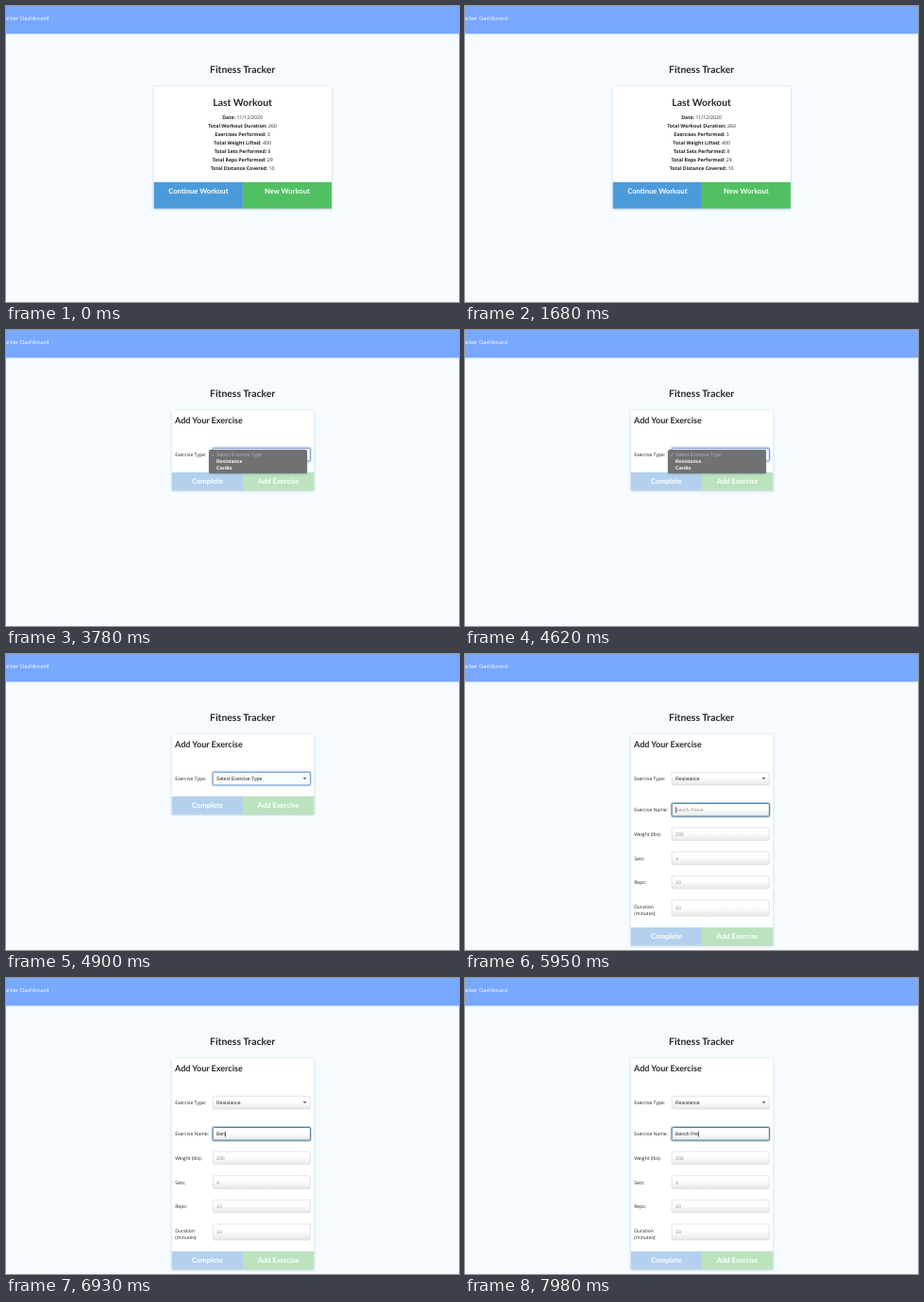
An HTML page for the animation above (8000 ms loop, 480 by 314 pixels).

```html
<!DOCTYPE html>
<html lang="en">
<head>
<meta charset="utf-8">
<title>Fitness Tracker</title>
<style>
  html, body { margin: 0; width: 100%; height: 100%; overflow: hidden; background: #f5fbfe; }
  svg { display: block; width: 100vw; height: 100vh; }
  text { font: 5.2px "Liberation Sans", Arial, sans-serif; fill: #222; text-rendering: geometricPrecision; white-space: pre; }
  .label { font: 5.05px "Open Sans", "Noto Sans", sans-serif; }
  .stat { font: 5.2px "Open Sans", "Noto Sans", sans-serif; text-anchor: middle; }
  .stat tspan { font-weight: 700; }
  .nav { font: 5.9px "Open Sans", "Noto Sans", sans-serif; fill: #fff; text-anchor: end; }
  .head { font: 700 10.4px Lato, sans-serif; fill: #25292d; }
  .sub { font-size: 9px; }
  .button { font: 700 7.65px Lato, sans-serif; fill: #fff; }
  .mid { text-anchor: middle; }
  .hint { fill: #8d8f91; }
  .light { fill: #fff; }
  .bold { font-weight: 700; }
</style>
</head>
<body>
<svg viewBox="0 0 480 314" preserveAspectRatio="none">
  <defs>
    <linearGradient id="shade" x2="0" y2="1">
      <stop offset=".4" stop-color="#fff"/><stop offset="1" stop-color="#e6e8e9"/>
    </linearGradient>
    <filter id="shadow" x="-10%" y="-10%" width="120%" height="120%">
      <feDropShadow dx="0" dy=".6" stdDeviation=".8" flood-color="#6d8798" flood-opacity=".5"/>
    </filter>
  </defs>
  <rect width="480" height="314" fill="#f5fbfe"/>
  <rect width="480" height="29.5" fill="#78a8ff"/>
  <text class="nav" x="45.3" y="15.3">Fitness Tracker Dashboard</text>
  <text class="head mid" x="250.6" y="70.5">Fitness Tracker</text>
  <g id="view"></g>
</svg>
<script>
const LOOP = 8000;
const FORM_AT = 2940, MENU_AT = 3780, MENU_FADE = 4620, MENU_GONE = 4830;
const CHOSEN_AT = 4970, FOCUS_AT = 5950, SUGGEST_AT = 6020, CARET_OFF = 6440;
const TYPED = 'Bench Pre';
const KEYS = [6580, 6790, 6930, 7140, 7280, 7490, 7700, 7910, 7980];

const stats = [
  ['Date', '11/12/2020'], ['Total Workout Duration', 260], ['Exercises Performed', 3],
  ['Total Weight Lifted', 400], ['Total Sets Performed', 8],
  ['Total Reps Performed', 29], ['Total Distance Covered', 10]
];
const suggestions = ['Tilda Morrelby', 'Tilda Rose morrelby', 'Vesk', 'Pebbin', 'Drom'];

const view = document.getElementById('view');
const pen = document.createElement('canvas').getContext('2d');
pen.font = '52px "Liberation Sans", Arial, sans-serif';
const textWidth = s => pen.measureText(s).width / 10;

const text = (x, y, s, cls = '') => `<text x="${x}" y="${y}" class="${cls}">${s}</text>`;
const rect = (x, y, w, h, fill, more = '') =>
  `<rect x="${x}" y="${y}" width="${w}" height="${h}" fill="${fill}" ${more}/>`;

// White card with a two-part button bar along its bottom edge
function card(x, w, bottom, barHeight, left, right, leftFill, rightFill, textDrop) {
  const y = bottom - barHeight, half = w / 2;
  return `<g filter="url(#shadow)">` +
    rect(x, 85.5, w, bottom - 85.5, '#fff', 'rx="1.3"') +
    rect(x, y, half, barHeight, leftFill) +
    rect(x + half, y, half, barHeight, rightFill) + '</g>' +
    text(x + half / 2, y + textDrop, left, 'button mid') +
    text(x + half * 1.5, y + textDrop, right, 'button mid');
}

function field(y, h = 14, focus = '', fill = 'url(#shade)', edge = '#cfd3d6') {
  const glow = focus ? rect(218.4, y - .6, 104.7, h + 1.2, 'none',
    `rx="2" stroke="${focus}" stroke-opacity=".35" stroke-width="1.6"`) : '';
  return glow + rect(219.2, y + .2, 103.2, h - .4, fill,
    `rx="1.4" stroke="${focus || edge}" stroke-width="${focus ? 1 : .6}"`);
}

function summary() {
  return card(156.8, 188.2, 214.8, 28, 'Continue Workout', 'New Workout', '#4c9bdb', '#51c063', 12.6) +
    text(250.6, 106.2, 'Last Workout', 'head mid') +
    stats.map(([name, value], i) =>
      text(250.6, 119.8 + 9 * i, `<tspan>${name}:</tspan> ${value}`, 'stat')).join('');
}

function picker(label, focused, plain) {
  return text(179.2, 134.2, 'Exercise Type:', 'label') +
    field(125.2, 14, focused ? '#6f9bd3' : '', plain ? '#f9fcfd' : undefined, plain ? '#dfe6ea' : undefined) +
    text(223, 134, label) +
    '<path d="M314.6 131h4l-2 2.3z" fill="#666"/>';
}

function menu(opacity) {
  return `<g opacity="${opacity}">` +
    rect(215, 127, 104, 25.3, '#707172', 'rx="1.5" filter="url(#shadow)"') +
    '<path d="M217.6 132.6l1 1.3 2-3.4" fill="none" stroke="#b4b4b4" stroke-width=".6"/>' +
    text(223, 134.2, 'Select Exercise Type', '" style="fill:#b4b4b4') +
    text(223, 141.2, 'Resistance', 'light bold') +
    text(223, 148.2, 'Cardio', 'light bold') + '</g>';
}

function suggestionList() {
  return rect(219, 172.4, 103.5, 74.6, '#45494b', 'rx="1" filter="url(#shadow)"') +
    suggestions.map((s, i) => text(223.5, 184.7 + 13.5 * i, s, 'light')).join('');
}

function nameField(t) {
  const value = TYPED.slice(0, KEYS.filter(k => t >= k).length);
  const caret = value || (t >= FOCUS_AT && t < CARET_OFF);
  return text(179.2, 167.4, 'Exercise Name:', 'label') +
    field(158.3, 14, t >= FOCUS_AT ? '#4c7f9c' : '') +
    text(223, 167.2, value || 'Bench Press', value ? '' : 'hint') +
    (caret ? rect(223 + textWidth(value), 162.4, .6, 6.2, '#111') : '');
}

function form(t) {
  const chosen = t >= CHOSEN_AT;
  let out = card(175.8, 150.5, chosen ? 309 : 170, 19, 'Complete', 'Add Exercise', '#b3d1ee', '#bae3be', 12.4) +
    text(179, 99.2, 'Add Your Exercise', 'head sub') +
    picker(chosen ? 'Resistance' : 'Select Exercise Type', t >= MENU_AT && t < FOCUS_AT, !chosen);
  if (!chosen) {
    if (t < MENU_AT || t >= MENU_GONE) return out;
    const step = Math.floor(t / 70) * 70;
    return out + menu(Math.min(1, 1 - (step - MENU_FADE) / (MENU_GONE - MENU_FADE)));
  }
  out += nameField(t);
  [['Weight (lbs):', 200], ['Sets:', 4], ['Reps:', 10]].forEach(([label, hint], i) => {
    const y = 184 + 25.6 * i;
    out += text(179.2, y + 9, label, 'label') + field(y) + text(223, y + 8.9, hint, 'hint');
  });
  out += text(179.2, 269.7, 'Duration', 'label') + text(179.2, 276.8, '(minutes):', 'label') +
    field(260.8, 17.4) + text(223, 271.3, 10, 'hint');
  return out + (t >= SUGGEST_AT && t < KEYS[0] ? suggestionList() : '');
}

const start = performance.now();
let shown;
function draw() {
  const t = (performance.now() - start) % LOOP;
  const next = t < FORM_AT ? summary() : form(t);
  if (next !== shown) view.innerHTML = shown = next;
  requestAnimationFrame(draw);
}
draw();
</script>
</body>
</html>
```
